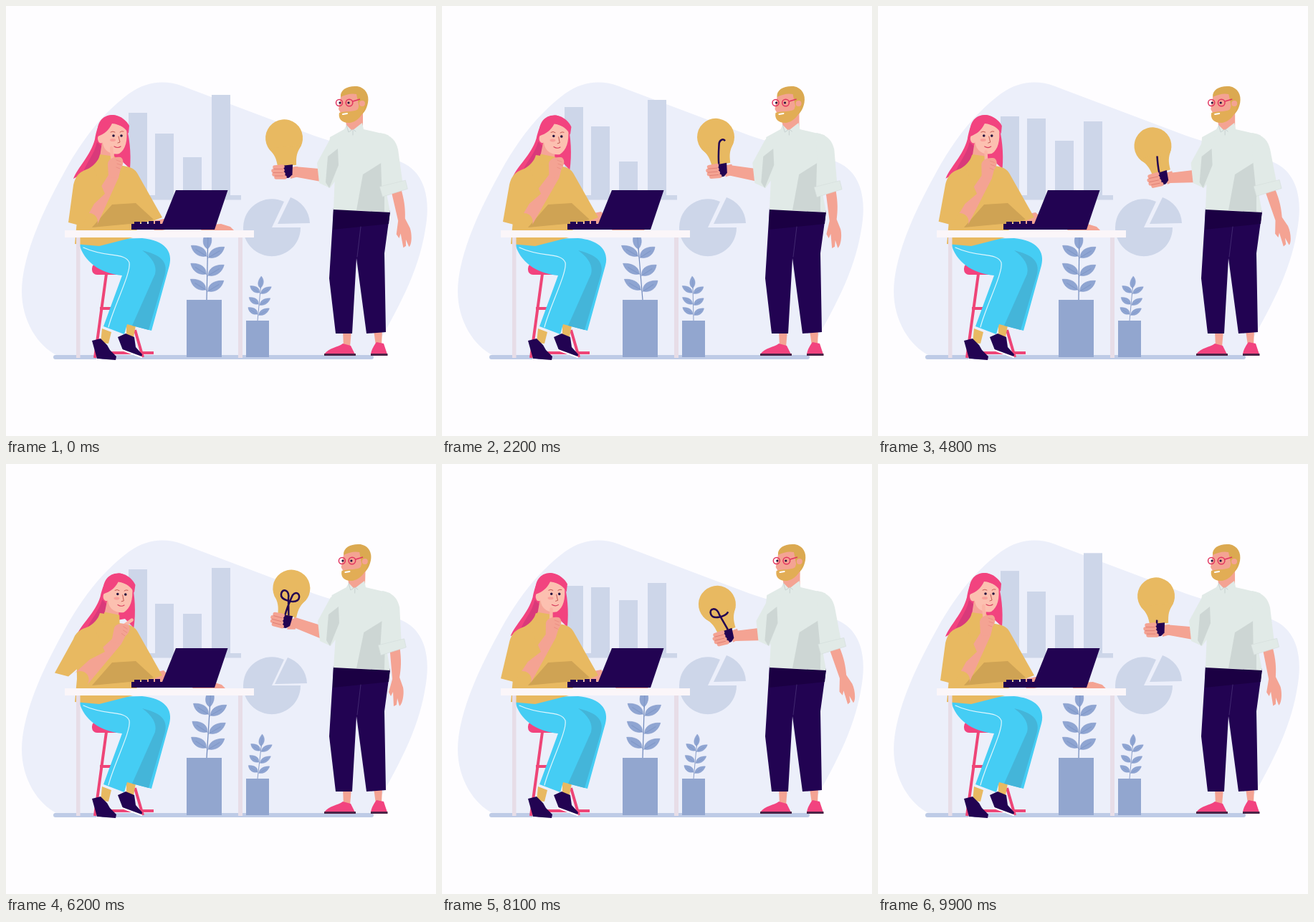
Animation of 600 by 600 pixels, one loop 10000 ms. Source, as an HTML page:

```html
<!DOCTYPE html>
<html lang="en">
<head>
<meta charset="utf-8">
<title>Sharing an idea</title>
<style>
  html, body { margin: 0; width: 100%; height: 100%; overflow: hidden; background: #fefdff; }
  svg { display: block; width: 100vw; height: 100vh; }
  .pale { fill: #cdd6e9; }
  .pot { fill: #92a6cf; }
  .leaf { fill: #8fa5d2; stroke: #7c93c6; stroke-width: .5; }
  .stem { fill: none; stroke: #6f88bb; stroke-width: 1.2; }
  .navy { fill: #220352; }
  .pink { fill: #f2437f; }
  .rod { fill: none; stroke: #ee4577; stroke-width: 4; }
  .gold { fill: #e8b961; }
  .ochre { fill: #cfa354; }
  .skin { fill: #f4a393; }
  .face { fill: #fcc0b0; }
  .shirt { fill: #e1eae7; }
  .fold { fill: #cdd6d4; }
  .line { fill: none; stroke-linecap: round; stroke-linejoin: round; }
</style>
</head>
<body>
<svg viewBox="0 0 600 600">
  <path fill="#eceffa" d="M72 488C45 475 22 440 22 398C23 340 60 270 88 220C112 180 135 150 172 122C195 106 220 102 247 112L430 181C480 198 530 206 556 220C587 236 592 275 585 312C575 375 545 425 510 488Z"/>
  <rect x="66" y="487" width="447" height="6" rx="3" fill="#becbe6"/>

  <g class="pale">
    <g id="bars"></g>
    <rect x="171" y="264" width="157" height="6.5"/>
    <path d="M371 309L388 273A40 40 0 1 0 411 309Z"/>
    <path id="slice" d="M379 304L397 267A40 40 0 0 1 424 303Z"/>
  </g>

  <rect class="pot" x="252" y="410" width="49" height="80"/>
  <rect class="pot" x="335" y="439" width="32" height="51"/>
  <g transform="translate(280 410)"><g id="big"></g></g>
  <g transform="translate(351 439) scale(.64)"><g id="small"></g></g>

  <!-- stool -->
  <rect class="pink" x="120" y="359" width="48" height="16" rx="7"/>
  <path class="rod" d="M140 374L124 491M131 422H146M124 484H206M180 452L191 490"/>

  <!-- seated woman -->
  <path class="gold" d="M134 450L147 455L143 471L132 470ZM168 441L181 446L178 462L168 461Z"/>
  <path class="navy" d="M120 467L132 464L141 473L145 480L154 489L153 494L127 492ZM156 462L167 457L179 462L181 476L190 486L189 490L163 480Z"/>
  <path class="line" stroke="#fff" stroke-width="2.2" d="M127 493L153 496.500M162 480L189 490"/>
  <path fill="#45cdf4" d="M103 326L190 324C222 327 233 343 228 362L203 453L169 444L165 458L136 447L162 376C138 374 112 362 103 335Z"/>
  <path fill="#44b5d9" d="M190 341C215 347 226 356 222 374L199 452L176 446L208 374C211 362 204 351 190 341Z"/>
  <path class="line" stroke="#dff6fd" stroke-width="1.2" d="M108 337C140 352 166 343 172 358C175 372 150 420 143 448"/>
  <g id="hair">
    <path class="pink" d="M148 152C131 154 127 170 124 186C118 209 100 225 94 241L130 222L160 215L173 227C175 205 172 180 167 165C162 156 155 152 148 152Z"/>
    <path fill="#d93a7a" d="M127 190C123 208 112 218 107 234L130 222L138 200Z"/>
  </g>
  <path id="reach" class="skin" d="M192 293L222 287L235 300L200 307Z"/>
  <path id="palm" class="skin" d="M272 313L276 306L300 304L313 308L318 313Z"/>
  <path class="gold" d="M131 208L151 211L158 222C170 224 178 225 183 233L218 295L205 300L184 304L181 322L130 335L96 332L99 300L98 240C105 230 126 226 131 208Z"/>
  <path class="ochre" d="M148 277L181 275L206 298L184 303L120 309Z"/>
  <g id="head">
    <path fill="#f6a598" d="M134 190L151 200L151 213L131 210Z"/>
    <path class="gold" d="M131 207L152 210L153 222L129 222Z"/>
    <path class="face" d="M131 179C138 177 143 169 147 162L168 170C170 188 167 200 158 206C149 208 139 204 136 195Z"/>
    <ellipse class="face" cx="132.5" cy="185" rx="4.5" ry="6.5"/>
    <path class="pink" d="M128 182C125 163 135 151 150 152C161 153 169 161 172 167L171 178C167 171 160 165 148 164C143 174 138 178 128 182Z"/>
    <g id="look">
      <circle cx="150" cy="181" r="1.800" fill="#26143f"/>
      <circle cx="161" cy="181" r="1.800" fill="#26143f"/>
      <ellipse cx="149" cy="187" rx="4" ry="2" fill="#f9a09a"/>
      <path class="line" stroke="#b5433f" stroke-width=".8" d="M146 176Q149 174 152 176M159 176Q161 174 164 175M157 182L159 190L156 191"/>
      <path class="line" stroke="#d84060" stroke-width="1.2" d="M151 196Q156 199 160 196"/>
    </g>
  </g>
  <path id="arm" class="skin"/>
  <path id="sleeve" class="gold"/>
  <g id="hand">
    <path id="finger" class="line" stroke="#fbb5a5" stroke-width="4.500"/>
    <path class="skin" d="M-8 3L-9 -16C-8 -23 0 -26 9 -25C14 -22 13 -14 9 -9L6 4Z"/>
    <path class="line" stroke="#e98b7f" stroke-width=".8" d="M3 -21L9 -19M4 -16L10 -14M3 -11L8 -9"/>
  </g>

  <!-- desk -->
  <path fill="#e7dde7" d="M98 322h5.500v169h-5.500zM324 322h6v169h-6z"/>
  <rect x="82" y="313" width="264" height="10" fill="#fbf6f9"/>
  <path class="navy" d="M237 257H309.500L291 312H175V304H218Z"/>
  <path class="navy" d="M179 301h8v5h-8zM189 301h8v5h-8zM199 300h7v6h-7zM208 300h7v6h-7z"/>

  <!-- standing man -->
  <path class="skin" d="M470 452H482L480 476H471ZM513 452H525L524 474H516Z"/>
  <path class="pink" d="M444 486C450 477 464 476 470 471L481 474L487 486ZM509 486C510 479 514 473 517 469L527 471L532 486Z"/>
  <path d="M444 485h44v3h-44zM509 485h23.500v3h-23.500z" fill="#4b2447"/>
  <path class="navy" d="M457 282L536 286L528 345L530 455L503 457L489 352L483 457L460 457L451 380Z"/>
  <path fill="#1b0043" d="M457 282L536 286L534 304L456 312Z"/>
  <path class="line" stroke="#4a3178" stroke-width=".8" d="M495 308L490 350"/>
  <g id="sway">
    <path class="skin" d="M472 150L498 148L498 176L476 172Z"/>
    <path id="swing" class="skin" d="M537 255L551 255C554 275 553 286 551 298L556 312C558 322 555 336 551 338L548 327L547 336L543 338L542 318L539 324L536 318L541 300Z"/>
    <path class="shirt" d="M475 166L483 174L497 163L499 172L533 180L545 196L527 240L536 288L457 284L459 235L449 215L452 183L472 172Z"/>
    <path class="fold" d="M498 235L528 216L528 287L489 285Z"/>
    <path id="upper" class="shirt"/>
    <path id="cuff" class="shirt" stroke="#d3dcda" stroke-width=".6" d="M522 252L558 243L561 255L526 266Z"/>
    <path class="line" stroke="#c5cfce" stroke-width=".9" d="M475 166L478 176L484 172L488 175M484 174V180"/>
    <path class="skin" d="M468 121L490 121L499 130L498 150L480 160L468 151L464 144Z"/>
    <path fill="#dba951" d="M467 127C466 116 477 111 490 112C502 114 507 124 505 135C503 145 499 149 497 151L493 142L489 123Q479 121 467 127Z"/>
    <path fill="#e2ad55" d="M465 149C463 158 470 164 480 163C492 161 501 149 500 137L494 134L491 144C487 148 475 146 465 149Z"/>
    <circle class="skin" cx="497" cy="136" r="4"/>
    <path class="line" stroke="#fff" stroke-width="2" d="M470 151L476 150"/>
    <circle cx="466" cy="135" r="1.600" fill="#26143f"/><circle cx="478" cy="135" r="1.600" fill="#26143f"/>
    <g fill="none" stroke="#e2335f" stroke-width="1.5"><circle cx="465" cy="135" r="4.500"/><circle cx="479" cy="135" r="4.800"/><path d="M484 133L494 130"/></g>
  </g>
  <path id="fore" class="skin"/>
  <g id="near">
    <path class="shirt" d="M468 181L452 186L434 219L437 247L452 254L466 235Z"/>
    <path class="fold" d="M449 210L463 199L464 222L451 254L446 246Z"/>
  </g>
  <g id="grip">
    <path class="skin" d="M2 -6L14 -7L15 7L4 10Z"/>
    <g id="bulb">
      <circle class="gold" cy="-47" r="26"/>
      <path class="gold" d="M-23 -35C-15 -24 -14 -20 -13 -8H13C14 -20 15 -24 23 -35Z"/>
      <path id="wire" class="line" pathLength="100" stroke="#220352" stroke-width="2.500" style="stroke-linecap:butt" d="M2 -9L-2 -32C-2 -45 -13 -46 -13 -37C-13 -28 6 -27 11 -32C16 -38 8 -47 3 -38C1 -30 -2 -20 -3 -9"/>
      <path class="navy" d="M-9 -9H8L6 5L1 9H-6Z"/>
    </g>
    <path class="line" stroke="#f4a393" stroke-width="5.500" d="M-18 -6L-7 -7M-20 -1L-7 -2M-19 4L-6 3M-16 8L-4 8"/>
    <path class="line" stroke="#dc7a70" stroke-width=".8" d="M-19 -3.500H-7M-20 1.500H-7M-18 6H-6"/>
  </g>
</svg>
<script>
const LOOP = 10000, STEP = 100;
const BEATS = [0, 2200, 3800, 4800, 6200, 8100];
const $ = id => document.getElementById(id);
const set = (id, name, value) => $(id).setAttribute(name, value);
const move = (id, value) => set(id, 'transform', value);
const wave = (t, period, peak) => Math.cos(2 * Math.PI * (t - peak) / period);
const clamp = v => Math.max(0, Math.min(1, v));

// Eased value at time t, wrapping back to the first key.
function ease(t, values, times = BEATS) {
  let i = times.length - 1;
  while (times[i] > t) i--;
  const end = times[i + 1] ?? LOOP;
  const k = (t - times[i]) / (end - times[i]);
  const next = values[(i + 1) % values.length];
  return values[i] + (next - values[i]) * k * k * (3 - 2 * k);
}

// Limb narrowing from a at width wa to b at width wb.
function limb([ax, ay], wa, [bx, by], wb) {
  const len = Math.hypot(bx - ax, by - ay);
  const nx = (ay - by) / len / 2, ny = (bx - ax) / len / 2;
  return `M${ax + nx * wa} ${ay + ny * wa}L${bx + nx * wb} ${by + ny * wb}` +
    `L${bx - nx * wb} ${by - ny * wb}L${ax - nx * wa} ${ay - ny * wa}` +
    `A${wa / 2} ${wa / 2} 0 0 1 ${ax + nx * wa} ${ay + ny * wa}Z`;
}

const BARS = [
  [171, [149, 141, 165, 154, 147, 170]],
  [208, [178, 168, 164, 157, 195, 172]],
  [247, [211, 217, 211, 188, 209, 190]],
  [287, [124, 131, 125, 161, 145, 166]]
];
$('bars').innerHTML = BARS.map(([x]) => `<rect x="${x}" width="26"/>`).join('');

function growPlant(id) {
  const leaf = (y, angle, side = 1) => `<g transform="translate(0 ${y}) scale(${side} 1) rotate(${angle})">
    <path class="leaf" d="M2 0C6 -8 17 -9 28 -1C20 7 9 7 2 0Z"/><path class="stem" d="M0 0H20" opacity=".4"/></g>`;
  $(id).innerHTML = '<path class="stem" d="M0 0V-80"/>' + leaf(-69, -90) +
    [-58, -33, -11].map(y => leaf(y, -32) + leaf(y - 2, -32, -1)).join('');
}
growPlant('big');
growPlant('small');

const bend = lean => `skewX(${-Math.atan(lean / 96) * 180 / Math.PI})`;

function drawScene(t) {
  BARS.forEach(([, tops], i) => {
    const y = ease(t, tops), bar = $('bars').children[i];
    bar.setAttribute('y', y);
    bar.setAttribute('height', 265 - y);
  });
  const slip = ease(t, [0, 0, .25, 0, 1, 0]);
  move('slice', `translate(${-4 * slip} ${3 * slip})`);
  move('big', bend(ease(t, [2, -8, -6, 1, 6, 3])));
  move('small', bend(ease(t, [9, -2, 0, 9, 11, 9])));
}

function drawWoman(t) {
  const point = ease(t, [0, 1, .1, 0, .12, 1, .95, .55, .25, .55, 0],
    [0, 1150, 2200, 3800, 4800, 5700, 6200, 7000, 8100, 8900, 9900]);
  const turn = ease(t, [0, 1, 1, .1, .1, 1, .35], [0, 1150, ...BEATS.slice(1)]);
  const fist = ease(t, [0, 1, 0, .2, 0, .1]);

  const pose = `translate(${6 * turn}) rotate(${3 * turn} 140 215)`;
  move('hair', pose);
  move('head', pose);
  move('look', `translate(${ease(t, [0, -2, -4, -3, -2, 0])} 0)`);

  const elbow = [116 - 13 * point, 301];
  const wrist = [151 + 5 * point + 6 * fist, 236 + 11 * point - fist];
  set('arm', 'd', limb(elbow, 24, wrist, 14));
  const tip = 87 - 20 * point, hem = 302 - 11 * point;
  set('sleeve', 'd', `M122 225C104 230 98 234 94 ${250 - 6 * point}L${tip} ${hem}L${tip + 19} ${hem + 5}L${elbow[0] + 7} 276L138 262Z`);
  move('hand', `translate(${wrist}) rotate(${15 * point})`);
  const angle = (-5 + 50 * point * point) * Math.PI / 180, reach = 22 * (1 - fist);
  set('finger', 'd', `M-2 -16l${Math.sin(angle) * reach} ${-Math.cos(angle) * reach}`);

  move('palm', `translate(${ease(t, [0, -35, -35, -8, -12, -30])} 0)`);
  move('reach', `translate(${ease(t, [8, 0, -4, -2, -2, 0])} ${ease(t, [8, 0, 0, 1, 1, 0])})`);
}

function drawMan(t) {
  const phase = t / 2500 % 1, lean = (1 - wave(t, 2500, 0)) / 2;
  const slope = .026 * lean;
  move('sway', `matrix(1 0 ${-slope} 1 ${285 * slope} 0)`);
  const out = wave(t, LOOP / 3, 920), shift = 4 * out;
  move('swing', `translate(${shift + 1} 0) rotate(${-9.5 - 9.5 * out} 543 258)`);
  move('cuff', `translate(${shift} ${-out})`);
  set('upper', 'd', `M522 177C538 180 544 188 547 200L${554 + shift} 246L${525 + shift} 254L523 215Z`);

  const x = ease(t, [393, 391, 398, 398, 391, 400]);
  const y = ease(t, [231, 229, 229, 240, 220, 240]);
  const tilt = ease(t, [-6, -11, 0, -18, 9, -20]);
  const dx = 2 * lean + (x - 393) * .5;
  set('fore', 'd', limb([446 + dx, 237], 18, [x + 9, y], 14));
  move('near', `translate(${dx} 0)`);
  move('grip', `translate(${x} ${y}) rotate(${tilt + 6})`);
  move('bulb', 'rotate(-6)');
  // The wire grows from one end, then vanishes from that same end.
  const head = 100 * clamp(phase * 2.5), tail = 100 * clamp((phase - .7) * 3.7);
  set('wire', 'stroke-dasharray', `0 ${tail} ${head - tail} 200`);
}

const start = performance.now();
function frame() {
  const t = Math.floor((performance.now() - start) % LOOP / STEP) * STEP;
  drawScene(t);
  drawWoman(t);
  drawMan(t);
  requestAnimationFrame(frame);
}
frame();
</script>
</body>
</html>
```
